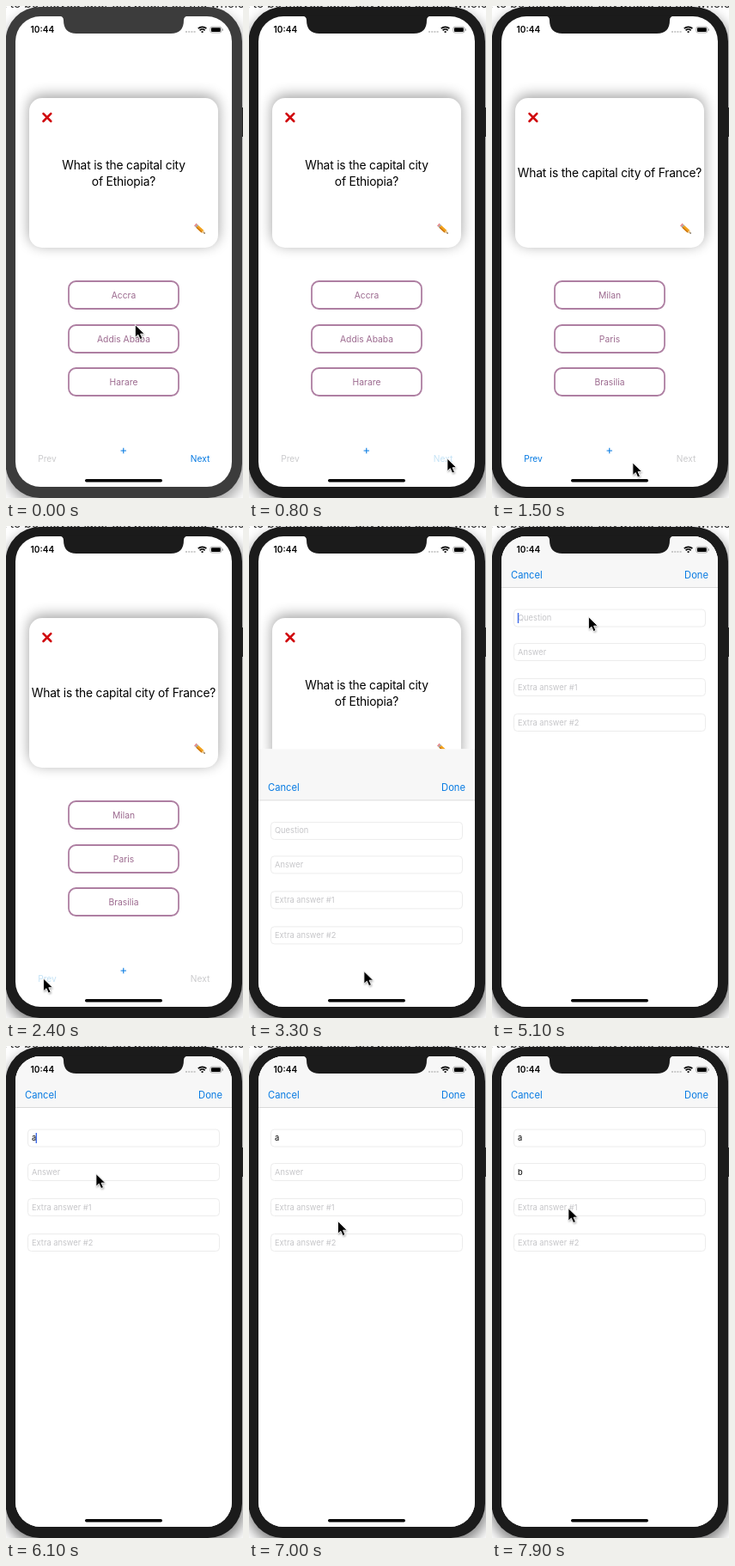
An HTML page that plays this animation: 276x572 px, repeating every 8 s.

```html
<!DOCTYPE html>
<html lang="en">
<head>
<meta charset="utf-8">
<title>Flashcards</title>
<style>
html, body { margin: 0; width: 100%; height: 100%; overflow: hidden; background: #fff; }
svg { display: block; }
text { font-family: Inter, Roboto, "Open Sans", sans-serif; }
.mid { text-anchor: middle; }
.blue { fill: #067ae2; }
</style>
</head>
<body>
<svg id="stage" width="276" height="572" viewBox="0 0 276 572">
  <defs>
    <clipPath id="screen"><rect x="11" y="12" width="252" height="547" rx="29"/></clipPath>
    <filter id="soft" x="-30%" y="-30%" width="160%" height="160%"><feGaussianBlur stdDeviation="8"/></filter>
    <filter id="tiny" x="-50%" y="-50%" width="200%" height="200%"><feGaussianBlur stdDeviation="1"/></filter>
  </defs>

  <rect width="276" height="572" fill="#fff"/>
  <rect id="glow" x="-2" y="8" width="280" height="572" rx="42" filter="url(#soft)"/>
  <text x="-4" y="1.6" font-size="14" fill="#222">t to be moved later anywhere on the whole e</text>
  <path d="M275 118v34" stroke="#222" stroke-width="2"/>
  <rect id="bezel" x="-.5" y="1" width="275.5" height="571" rx="40"/>

  <g clip-path="url(#screen)">
    <rect x="11" y="12" width="252" height="547" fill="#fff"/>
    <rect x="27" y="104" width="220" height="174" rx="15" opacity=".38" filter="url(#soft)"/>
    <rect x="27" y="107" width="220" height="174" rx="15" fill="#fff"/>
    <path d="M43.5 125.2l8.800 8.800m0-8.800l-8.800 8.800" stroke="#d0090d" stroke-width="2.6" stroke-linecap="round"/>
    <g transform="translate(220.3 254) rotate(43)">
      <path d="M0-1.9h2v3.8h-2z" fill="#e88a8a"/>
      <path d="M2-1.9h1.4v3.8h-1.4z" fill="#8f9a9c"/>
      <path d="M3.4-1.9h8.4v3.8h-8.4z" fill="#f2a21c"/>
      <path d="M3.4.7h8.4v1.2h-8.4z" fill="#c8700f"/>
      <path d="M11.8-1.9l4 1.9-4 1.9z" fill="#e9c48d"/>
      <path d="M14.2-.8l1.7.8-1.7.8z" fill="#333"/>
    </g>
    <g id="question" class="mid" font-size="13.8" letter-spacing="-.18"></g>
    <g id="choices"></g>
    <text id="prev" x="48" y="529.6" class="mid" font-size="10.2">Prev</text>
    <text id="next" x="226" y="529.6" class="mid" font-size="10.2">Next</text>
    <path id="plus" d="M133.6 517h6.4m-3.2-3.2v6.4" stroke="#067ae2" stroke-width="1.1"/>

    <g id="sheet">
      <rect x="11" y="12" width="252" height="560" fill="#fff"/>
      <rect x="11" y="12" width="252" height="59" fill="#f7f7f7"/>
      <path d="M11 71.5h252" stroke="#dadada"/>
      <text x="22" y="60.8" class="blue" font-size="11.2">Cancel</text>
      <text x="252" y="60.8" class="blue" font-size="11.2" text-anchor="end">Done</text>
      <g id="fields"></g>
      <path id="caret" stroke="#3f6be8" stroke-width="1.4"/>
    </g>

    <text x="28.600" y="31.2" font-size="10.1" font-weight="600">10:44</text>
    <path d="M209 30h2m1.2 0h2m1.2 0h2m1.2 0h2" stroke="#bbb" stroke-width="1.7"/>
    <g fill="none" stroke="#000" stroke-width="1.7">
      <path d="M223.8 26.2a7 7 0 0 1 9.6 0M225.6 28.3a4.4 4.4 0 0 1 6 0"/>
      <path d="M227.6 30.1h2" stroke-width="1.8"/>
    </g>
    <rect x="237.9" y="24.2" width="13" height="6.8" rx="2" fill="none" stroke="#888" stroke-width=".7"/>
    <rect x="239" y="25.3" width="10.8" height="4.6" rx="1"/>
    <path d="M252.2 26.4v2.4" stroke="#888"/>
    <rect x="92" y="550" width="90" height="3.4" rx="1.7"/>
  </g>
  <path id="notch" d="M62 11.5q5 .5 5 5q0 15.5 15 15.5h110q15 0 15-15.5q0-4.5 5-5z"/>

  <g id="cursor">
    <path d="M1 2v15l3.5-3 2.5 5 3-1.3-2.3-5H12z" opacity=".35" filter="url(#tiny)"/>
    <path d="M.4.6V15.3L3.8 12.2 6.2 17.6 9 16.4 6.6 11.2H11.3Z" fill="#000" stroke="#fff" stroke-width=".9"/>
  </g>
</svg>
<script>
const LOOP = 8000, STEP = 100;
const $ = id => document.getElementById(id);

const cards = [
  { q: ["What is the capital city", "of Ethiopia?"], a: ["Accra", "Addis Ababa", "Harare"] },
  { q: ["What is the capital city of France?"], a: ["Milan", "Paris", "Brasilia"] }
];
const hints = ["Question", "Answer", "Extra answer #1", "Extra answer #2"];
const fieldTops = [97, 136.5, 177.5, 218.5];

// time, x, y of the pointer tip
const path = [
  [0, 150, 370], [700, 230.5, 525.5], [1100, 230.5, 525.5], [1700, 140, 532],
  [2300, 43.2, 525.5], [2600, 43.2, 525.5], [3000, 133.5, 517], [3500, 133.5, 517],
  [3600, 133.5, 512], [4000, 133.5, 94], [4500, 111, 105], [4600, 112, 105],
  [5300, 112, 105], [5800, 106, 153], [6100, 104.5, 148], [6300, 104.5, 148],
  [7000, 103, 203], [7200, 103, 203], [7500, 102, 219], [7900, 88.5, 188]
];

const ease = p => p * p * (3 - 2 * p);
const within = (t, a, b) => t >= a && t < b;

function pointer(t) {
  const i = path.findIndex(k => k[0] > t);
  if (i < 0) return path[path.length - 1].slice(1);
  const [t0, x0, y0] = path[i - 1], [t1, x1, y1] = path[i];
  const p = ease((t - t0) / (t1 - t0));
  return [x0 + (x1 - x0) * p, y0 + (y1 - y0) * p];
}

// cubic-bezier(.38, .7, .125, 1)
function rise(x) {
  if (x <= 0) return 0;
  if (x >= 1) return 1;
  const bez = (s, a, b) => 3 * (1 - s) ** 2 * s * a + 3 * (1 - s) * s * s * b + s ** 3;
  let lo = 0, hi = 1;
  for (let i = 0; i < 20; i++) {
    const m = (lo + hi) / 2;
    if (bez(m, .38, .125) < x) lo = m; else hi = m;
  }
  return bez(lo, .7, 1);
}

$("choices").innerHTML = [320, 371, 421].map(y =>
  `<rect x="73" y="${y}" width="128" height="32" rx="8.5" fill="#fff" stroke="#ae7fa2" stroke-width="1.8"/>
   <text x="137" y="${y + 20}" class="mid" font-size="10.3" fill="#9c6a8f"></text>`).join("");
$("fields").innerHTML = fieldTops.map(y =>
  `<rect x="25.5" y="${y}" width="223" height="20" rx="4" fill="#fff" stroke="#ececec"/>
   <text x="30" y="${y + 13}" font-size="9.3"></text>`).join("");
const labels = $("choices").querySelectorAll("text");
const inputs = $("fields").querySelectorAll("text");

let shown = -1;
function showCard(n) {
  if (n === shown) return;
  shown = n;
  const { q, a } = cards[n];
  const top = q.length > 1 ? 190 : 199.3;
  $("question").innerHTML = q.map((s, i) => `<text x="137" y="${top + i * 18.5}">${s}</text>`).join("");
  labels.forEach((el, i) => el.textContent = a[i]);
}

function paintLink(id, enabled, pressed) {
  $(id).setAttribute("fill", pressed ? "#c4e2f5" : enabled ? "#067ae2" : "#cbcbcd");
}

function showCaret(t) {
  const second = t >= 6300;
  const since = t - (second ? 6300 : 4900);
  const on = since >= 0 && t < 7800 && since % 1000 < 600 || within(t, 6000, 6200);
  const typed = second ? t >= 7300 : t >= 5500;
  const x = typed ? 35.3 : 30.5, y = second ? 140.5 : 101;
  $("caret").setAttribute("d", on ? `M${x} ${y}v12` : "");
}

function draw(t) {
  const active = t >= 400;
  const body = active ? "#1b1b1b" : "#3c3c3c";
  $("bezel").setAttribute("fill", body);
  $("notch").setAttribute("fill", body);
  $("glow").setAttribute("opacity", active ? .5 : .35);

  const last = within(t, 1000, 2600);
  showCard(last ? 1 : 0);
  paintLink("prev", last, within(t, 2400, 2600));
  paintLink("next", !last, within(t, 800, 1000));
  $("plus").setAttribute("opacity", within(t, 3100, 3300) ? .3 : 1);

  const drop = 547 * (1 - rise((t - 3187) / 500));
  $("sheet").setAttribute("transform", `translate(0 ${drop.toFixed(2)})`);

  const values = [t >= 5500 ? "a" : "", t >= 7300 ? "b" : "", "", ""];
  inputs.forEach((el, i) => {
    el.textContent = values[i] || hints[i];
    el.setAttribute("fill", values[i] ? "#000" : "#c6c6c9");
  });
  showCaret(t);

  const [x, y] = pointer(t);
  $("cursor").setAttribute("transform", `translate(${x.toFixed(1)} ${y.toFixed(1)})`);
}

const start = performance.now();
function tick(now) {
  const t = Math.max(0, now - start) % LOOP;
  draw(Math.floor(t / STEP) * STEP);
  requestAnimationFrame(tick);
}
draw(0);
requestAnimationFrame(tick);
</script>
</body>
</html>
```
